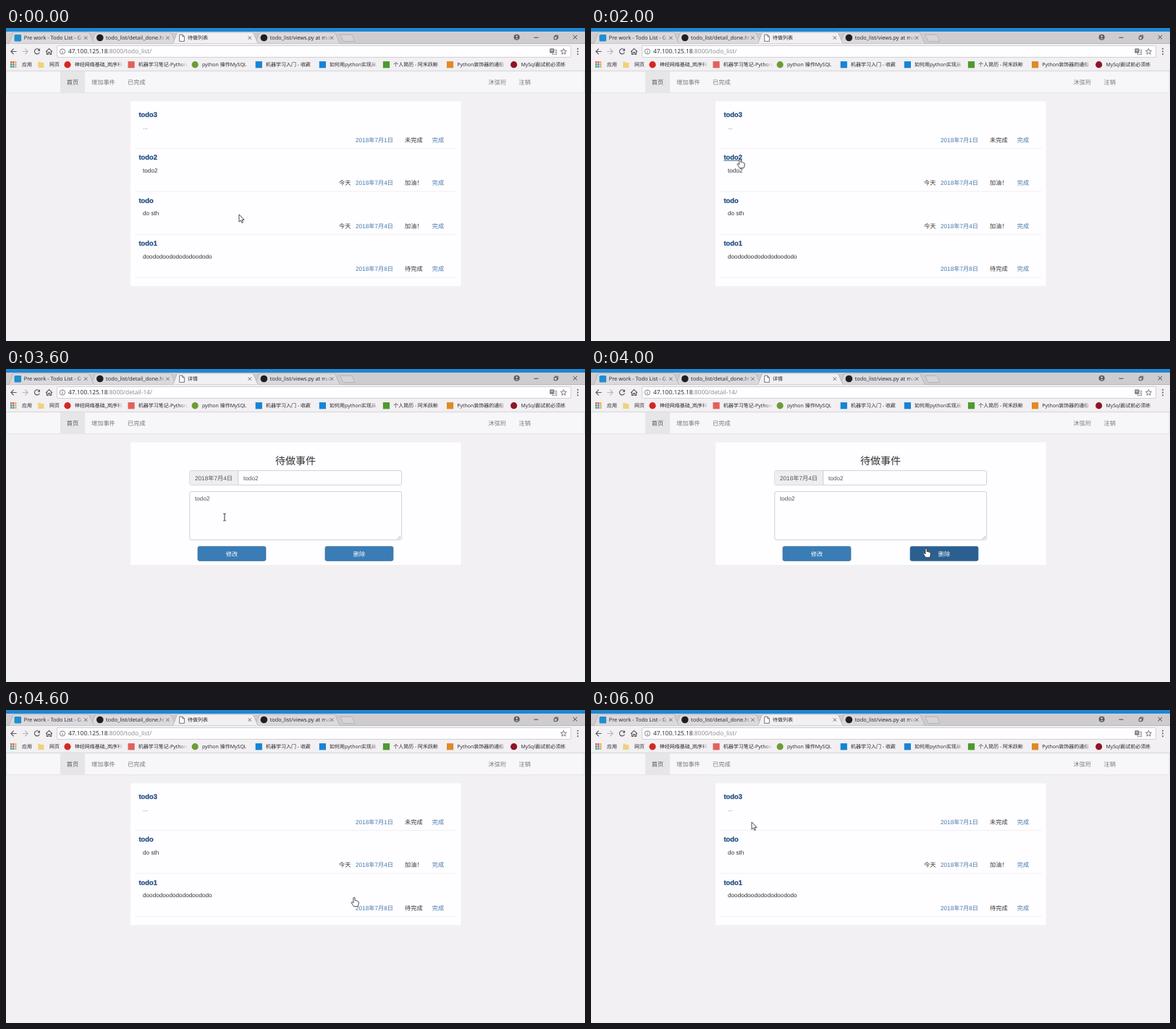
Animation of 800 by 433 pixels, one loop 6.1 s. Source, as an HTML page:

```html
<!DOCTYPE html>
<html lang="zh-CN">
<head>
<meta charset="utf-8">
<title>Todo list</title>
<style>
html, body { margin: 0; width: 100%; height: 100%; overflow: hidden; background: #f2f0f3; }
#stage { display: block; width: 800px; height: 433px; }
text { text-rendering: geometricPrecision; white-space: pre; }
.page { font: 8.2px "Liberation Sans", "Noto Sans CJK SC", "Noto Sans CJK", sans-serif; }
.ui { font: 7px "Open Sans", "Noto Sans CJK SC", "Noto Sans CJK", sans-serif; }
.tab { font-size: 7.4px; }
</style>
</head>
<body>
<svg id="stage" viewBox="0 0 800 433"></svg>
<script>
const LOOP = 6100, STEP = 100;
const OPEN = 3200, DELETE = 4400;
const BG = '#f2f0f3', PANEL = '#fefdff', TAB = '#dbd9dd';
const INK = '#333', UI_INK = '#252427', LINK = '#4378ad', TITLE = '#1f4c80', ICON = '#5a5a5e';

const rect = (x, y, w, h, fill, extra = '') =>
  `<rect x="${x}" y="${y}" width="${w}" height="${h}" fill="${fill}" ${extra}/>`;
const dot = (x, y, r, fill, extra = '') =>
  `<circle cx="${x}" cy="${y}" r="${r}" fill="${fill}" ${extra}/>`;
const line = (d, color, w = 1) =>
  `<path d="${d}" fill="none" stroke="${color}" stroke-width="${w}"/>`;
const text = (x, y, s, fill = INK, extra = '') =>
  `<text x="${x}" y="${y}" fill="${fill}" ${extra}>${s}</text>`;
const group = (id, body) => `<g id="${id}">${body}</g>`;

// Label cut at width w, fading out at its right end
const label = (x, y, w, s, fade) =>
  `<svg x="${x}" y="${y - 9}" width="${w}" height="13">${text(0, 9, s, UI_INK)}` +
  rect(w - 9, 0, 9, 13, `url(#${fade})`) + '</svg>';

const fadeDef = (id, color) =>
  `<linearGradient id="${id}"><stop stop-color="${color}" stop-opacity="0"/>` +
  `<stop offset="1" stop-color="${color}"/></linearGradient>`;

function tab(i, title, icon) {
  const x = 4 + i * 113.3, fill = title ? TAB : BG;
  return `<path d="M${x} 21.5L${x + 5.6} 7.2Q${x + 6.2} 6 ${x + 7.6} 6H${x + 109}` +
    `Q${x + 110.6} 6 ${x + 111.2} 7.2L${x + 117.5} 21.5" fill="${fill}" stroke="#aaa8ac" stroke-width=".7"/>` +
    icon(x + 12.5) +
    (title ? `<g class="tab">${label(x + 20.8, 16, 82, title, 'fadeTab')}</g>` : '') +
    line(`M${x + 104} 11.4l4.4 4.4m0 -4.4l-4.4 4.4`, '#59575b', .9);
}

const octo = x => dot(x, 13.5, 4.8, '#1f1f22');
const board = x => rect(x - 5, 9, 9.6, 9.6, '#1f8ed0', 'rx="1.5"');
const sheet = x => `<path d="M${x - 3.4} 9.2H${x + .8}L${x + 3.3} 11.8V18.4H${x - 3.4}ZM${x + .8} 9.2V11.8H${x + 3.3}" fill="#fff" stroke="#555" stroke-width=".8"/>`;

function chrome() {
  const windowButtons =
    dot(705.7, 12.8, 4, '#59575b') + dot(705.7, 11.6, 1.3, '#d0cdd1') +
    `<path d="M703.2 15.2Q705.7 12.8 708.2 15.2Z" fill="#d0cdd1"/>` +
    line('M729.5 13.2h6', '#333', .9) +
    line('M757.3 11.7h4v4h-4zM758.7 11.7v-1.5h4v4h-1.4', '#333', .8) +
    line('M783.6 10l5.4 5.4m0 -5.4l-5.4 5.4', '#333', .9);

  const tools =
    line('M14.6 32.5H7M10.6 28.7L6.9 32.5L10.6 36.3', ICON, 1.2) +
    line('M22.4 32.5H30M26.4 28.7L30.1 32.5L26.4 36.3', '#b9b7bb', 1.2) +
    line('M46 30.3A3.6 3.6 0 1 0 46.4 33.6', ICON, 1.2) +
    `<path d="M47 28.2V31.8H43.4Z" fill="${ICON}"/>` +
    line('M55 32.8L59.5 28.5L64 32.8M56.4 32V36.4H58.4V33.6H60.6V36.4H62.6V32', ICON, 1.1) +
    rect(70.5, 24.5, 710, 16, PANEL, 'rx="1.5" stroke="#c9c7cb" stroke-width=".8"') +
    dot(78, 32.5, 3.6, 'none', 'stroke="#666" stroke-width=".8"') +
    line('M78 32v2.6M78 30.2v.9', '#666', .9) +
    line('M770.4 28.5L771.5 31.2L774.4 31.4L772.2 33.3L772.9 36.2L770.4 34.6L767.9 36.2L768.6 33.3L766.4 31.4L769.3 31.2Z', '#59575b', .8) +
    [28.8, 32.5, 36.2].map(y => dot(790, y, 1, ICON)).join('') +
    group('translate',
      rect(755.2, 30.6, 5.6, 6.2, '#fff', 'stroke="#777" stroke-width=".7"') +
      rect(751.4, 28.4, 5.8, 6.2, '#77757a') +
      line('M752.6 30.4h3.4M754.3 30.4v2.8', '#fff', .7) +
      line('M757.8 33h2.2M759 33v2.4', '#777', .6));

  const grid = ['#d9483b', '#d9483b', '#e7a92c', '#2f9a57', '#3f7edb', '#e7a92c', '#2f9a57', '#3f7edb', '#e7a92c']
    .map((c, i) => rect(6 + i % 3 * 3.1, 46.2 + (i / 3 | 0) * 3.1, 2.3, 2.3, c)).join('');
  const marks = [
    ['神经网络基础_岚序科', '#d8261f', 1], ['机器学习笔记-Python', '#e2605a', 0],
    ['python 操作MySQL', '#6d9c35', 1], ['机器学习入门 - 收藏', '#1684d6', 0],
    ['如何用python实现从', '#1684d6', 0], ['个人简历 - 阿禾跃鲸', '#4d9a2e', 0],
    ['Python装饰器的通俗', '#e08a25', 0], ['MySql面试前必须练', '#8e1526', 1]
  ].map(([s, c, round], i) => {
    const x = 85 + i * 88.1;
    return (round ? dot(x, 50.7, 4.6, c) : rect(x - 4.6, 46.1, 9.2, 9.2, c)) +
      label(x + 9.7, 53.3, 67, s, 'fadeBar');
  }).join('');

  return rect(0, 0, 800, 22, '#cfccd0') + rect(0, 0, 800, 5, '#1e87d1') +
    rect(0, 21.5, 800, 37.5, BG) + line('M0 21.5H800', '#aaa8ac', .7) +
    tab(3, 'todo_list/views.py at master', octo) +
    tab(1, 'todo_list/detail_done.html', octo) +
    tab(0, 'Pre work - Todo List - G', board) +
    tab(2, '', sheet) +
    '<path d="M461.5 9.3H476.5Q478 9.3 478.6 10.4L482 18.6H467.4Q466 18.6 465.4 17.4Z" fill="#d6d4d8" stroke="#aaa8ac" stroke-width=".7"/>' +
    windowButtons + tools + grid + text(22, 53.3, '应用', UI_INK) +
    `<path d="M44.2 46.7H47.4L48.4 47.9H52.4V55.1H44.2Z" fill="#f0d27c"/>` + text(60, 53.3, '网页', UI_INK) +
    marks + line('M0 59.3H800', '#c3c1c5', .8);
}

function address(title, path) {
  return text(251, 16, title, UI_INK) +
    `<text x="86" y="35.4" font-size="8.4" fill="${UI_INK}">47.100.125.18<tspan fill="#88868a">:8000/${path}/</tspan></text>`;
}

function navbar() {
  const items = [[118, '增加事件'], [168, '已完成'], [666.5, '沐弦珩'], [708.5, '注销']];
  return rect(.5, 59.8, 798.6, 30, '#f7f6f8', 'stroke="#e2e0e3" stroke-width=".8"') +
    rect(75, 60, 34, 29.6, '#e6e5e7') + text(83.8, 77.6, '首页', '#555') +
    items.map(([x, s]) => text(x, 77.6, s, '#777')).join('');
}

const panel = bottom => rect(172, 101.5, 456.6, bottom - 101.5, PANEL);

function row([title, note, day, status], i) {
  const y = i * 59.5;
  return text(183.5, y + 122.6, title, TITLE, `font-size="9.37" font-weight="bold" stroke="${TITLE}" stroke-width=".25"`) +
    text(189, y + 140.2, note, note === '...' ? '#777' : INK) +
    (status === '加油！' ? text(460, y + 157.6, '今天') : '') +
    text(483, y + 157.6, `2018年7月${day}日`, LINK) +
    text(551, y + 157.6, status) + text(588.7, y + 157.6, '完成', LINK) +
    line(`M178 ${y + 166.6}H622.5`, '#eceaed', .8);
}

const todos = [
  ['todo3', '...', 1, '未完成'], ['todo2', 'todo2', 4, '加油！'],
  ['todo', 'do sth', 4, '加油！'], ['todo1', 'doododoododododoododo', 8, '待完成']
];
const list = items => panel(119 + items.length * 59.5) + items.map(row).join('');

function detail() {
  const edge = 'rx="2.3" stroke="#c6c5c8" stroke-width=".8"';
  const button = (x, s, id) =>
    rect(x, 245.4, 94, 20, '#3a7cb6', `id="${id}" rx="2.3" stroke="#336fa5" stroke-width=".7"`) +
    text(x + 47, 258.5, s, '#fff', 'text-anchor="middle" font-weight="500"');
  return panel(271) +
    text(400, 132.2, '待做事件', INK, 'font-size="14.05" text-anchor="middle"') +
    rect(253.8, 140.6, 292.8, 20, PANEL, edge) +
    '<path d="M256 141H320.8V160.2H256Q254.2 160.2 254.2 158.2V143Q254.2 141 256 141Z" fill="#eeedef"/>' +
    line('M320.8 140.6V160.6', '#c6c5c8', .8) +
    text(261, 153.6, '2018年7月4日', '#555') + text(328, 153.6, 'todo2', '#555') +
    rect(253.8, 169.6, 292.8, 66.8, PANEL, edge) + text(261, 182.4, 'todo2', '#555') +
    line('M540.6 235.4l4.6 -4.6M543 235.4l2.2 -2.2', '#888', .6) +
    button(265, '修改', 'edit') + button(441, '删除', 'remove');
}

const cursors = {
  arrow: '<path d="M0 0V10.2L2.4 8L4 11.6L5.5 10.9L4 7.4H7.2Z" fill="#fff" stroke="#222" stroke-width=".8"/>',
  hand: '<path d="M-1.1 1Q0 -1 1.1 1V4.6Q2.5 3.9 3 5.1Q4.4 4.4 4.8 5.7Q6 5.3 6.2 6.7V9Q6 11 5 12.8H-.6Q-1.8 10.6 -3.9 7.7Q-3.6 6 -2.2 6.9L-1.1 8Z" fill="#fff" stroke="#222" stroke-width=".8"/>',
  beam: line('M-1.8 -5Q0 -5 0 -4V4Q0 5 -1.8 5M1.8 -5Q0 -5 0 -4M0 4Q0 5 1.8 5', '#222', .9)
};

const stage = document.getElementById('stage');
stage.innerHTML =
  `<defs>${fadeDef('fadeTab', TAB)}${fadeDef('fadeBar', BG)}</defs>` +
  rect(0, 0, 800, 433, BG) +
  `<g class="ui">${chrome()}${group('listUrl', address('待做列表', 'todo_list'))}${group('detailUrl', address('详情', 'detail-14'))}</g>` +
  `<g class="page">${navbar()}` +
  group('before', list(todos) + group('underline', line('M183.5 183.4H209', TITLE, .8))) +
  group('after', list(todos.filter(t => t[0] !== 'todo2'))) +
  group('detail', detail()) + '</g>' +
  group('cursor', Object.keys(cursors).map(k => group(k, cursors[k])).join(''));

const $ = id => document.getElementById(id);
const show = (id, on) => { $(id).style.display = on ? '' : 'none'; };

// Pointer hot spot: time, x, y
const path = [
  [0, 322, 258], [800, 206, 181], [3100, 206, 181], [3600, 302, 205],
  [4000, 463, 248], [4300, 481, 259], [4700, 481, 259], [5700, 222, 155], [LOOP, 222, 155]
];

function pointer(t) {
  const i = path.findIndex(p => p[0] > t);
  const [t0, x0, y0] = path[i - 1], [t1, x1, y1] = path[i];
  const u = (t - t0) / (t1 - t0), e = u * u * (3 - 2 * u);
  return [x0 + (x1 - x0) * e, y0 + (y1 - y0) * e];
}

const inside = (x, y, l, t, r, b) => x > l && x < r && y > t && y < b;

function draw(t) {
  const [x, y] = pointer(t);
  const before = t < OPEN, after = t >= DELETE, editing = !before && !after;
  const onTitle = before && inside(x, y, 183, 174, 210, 186);
  const onEdit = editing && inside(x, y, 265, 245, 359, 266);
  const onRemove = editing && inside(x, y, 441, 245, 535, 266);
  const onField = editing && (inside(x, y, 254, 169, 547, 237) || inside(x, y, 321, 140, 547, 161));
  const waiting = after && t <= 4700;
  const kind = onTitle || onEdit || onRemove || waiting ? 'hand' : onField ? 'beam' : 'arrow';

  show('before', before);
  show('after', after);
  show('detail', editing);
  show('listUrl', !editing);
  show('detailUrl', editing);
  show('underline', onTitle);
  show('translate', !(t >= OPEN && t < 3500 || t >= DELETE && t < 4900));
  $('edit').setAttribute('fill', onEdit ? '#2b5f90' : '#3a7cb6');
  $('remove').setAttribute('fill', onRemove ? '#2b5f90' : '#3a7cb6');
  for (const k in cursors) show(k, k === kind);
  $('cursor').setAttribute('transform', `translate(${x} ${y})`);
}

const start = performance.now();
function tick() {
  const t = (performance.now() - start) % LOOP;
  draw(Math.floor(t / STEP) * STEP);
  requestAnimationFrame(tick);
}
tick();
</script>
</body>
</html>
```
